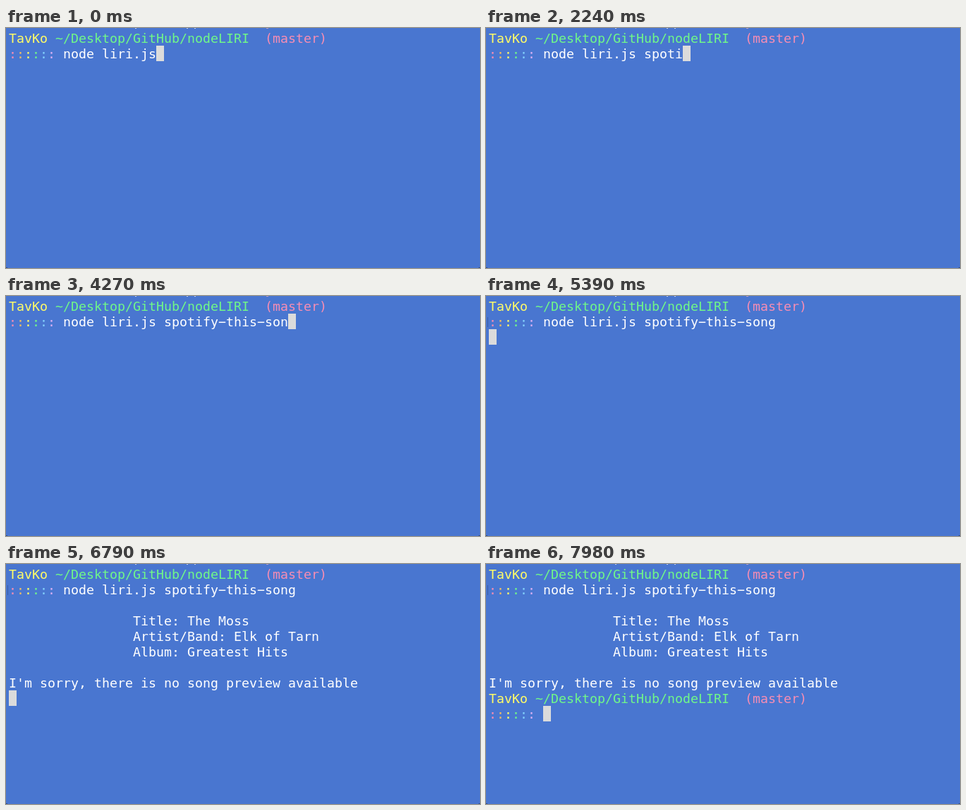
Animation of 672 by 340 pixels, one loop 8000 ms. Source, as an HTML page with a canvas:

```html
<!DOCTYPE html>
<html lang="en">
<head>
<meta charset="utf-8">
<title>Terminal session</title>
<style>
  html, body { margin: 0; width: 100%; height: 100%; overflow: hidden; background: #4976d0; }
  canvas { display: block; }
</style>
</head>
<body>
<canvas id="screen" width="672" height="340"></canvas>
<script>
const ctx = document.getElementById("screen").getContext("2d");
const LOOP = 8000, CELL = 11, LINE = 22, LEFT = 4, BASELINE = 21;
const WHITE = "#ffffff", YELLOW = "#fffc67", GREEN = "#70f888", PINK = "#f78db3";
const COLONS = [PINK, "#f3bd62", YELLOW, GREEN, "#82d0fb", "#d9b0f3"];

const COMMAND = "node liri.js";
const ARGUMENT = " spotify-this-song";
const KEY_TIMES = [560, 1050, 1260, 1680, 1960, 2170, 2380, 2520, 2730,
                   2870, 3010, 3150, 3290, 3570, 3850, 4060, 4200, 4410];
const ENTER = 4760, OUTPUT = 6300, DONE = 7140;
const RESULTS = ["Title: The Moss", "Artist/Band: Elk of Tarn", "Album: Greatest Hits"];

function rect(x, y, w, h, color) {
  ctx.fillStyle = color;
  ctx.fillRect(x, y, w, h);
}

function write(text, col, row, color = WHITE) {
  ctx.fillStyle = color;
  [...text].forEach((ch, i) => {
    // the terminal face has a wide hyphen
    const glyph = ch === "-" ? "\u2212" : ch;
    ctx.fillText(glyph, LEFT + (col + i) * CELL, BASELINE + row * LINE);
  });
}

function cursor(col, row) {
  rect(LEFT + col * CELL, 3 + row * LINE, CELL, LINE, "#dbdbdb");
}

function prompt(row) {
  write("TavKo", 0, row, YELLOW);
  write("~/Desktop/GitHub/nodeLIRI", 6, row, GREEN);
  write("(master)", 33, row, PINK);
  COLONS.forEach((color, i) => write(":", i, row + 1, color));
}

function windowEdges() {
  // descenders of the line scrolled off the top
  for (const x of [183, 256, 267]) rect(x, 0, 2, 1, "#c3d1ef");
  rect(369, 0, 3, 1, "#b79cc8");
  for (const x of [0, 670]) rect(x, 339, 2, 1, "#2d4a86");
}

function draw(t) {
  rect(0, 0, 672, 340, "#4976d0");
  windowEdges();
  ctx.font = '18.25px "DejaVu Sans Mono", monospace';
  prompt(0);

  const typed = COMMAND + ARGUMENT.slice(0, KEY_TIMES.filter(k => k <= t).length);
  write(typed, 7, 1);
  if (t >= ENTER) rect(2, 30, 1, 14, "#3b5da6");

  if (t >= OUTPUT) {
    RESULTS.forEach((text, i) => write(text, 16, 3 + i));
    write("I'm sorry, there is no song preview available", 0, 7);
  }

  if (t >= DONE) {
    prompt(8);
    cursor(7, 9);
  } else if (t >= OUTPUT) cursor(0, 8);
  else if (t >= ENTER) cursor(0, 2);
  else cursor(7 + typed.length, 1);
}

const start = performance.now();
function frame() {
  draw((performance.now() - start) % LOOP);
  requestAnimationFrame(frame);
}
frame();
</script>
</body>
</html>
```
